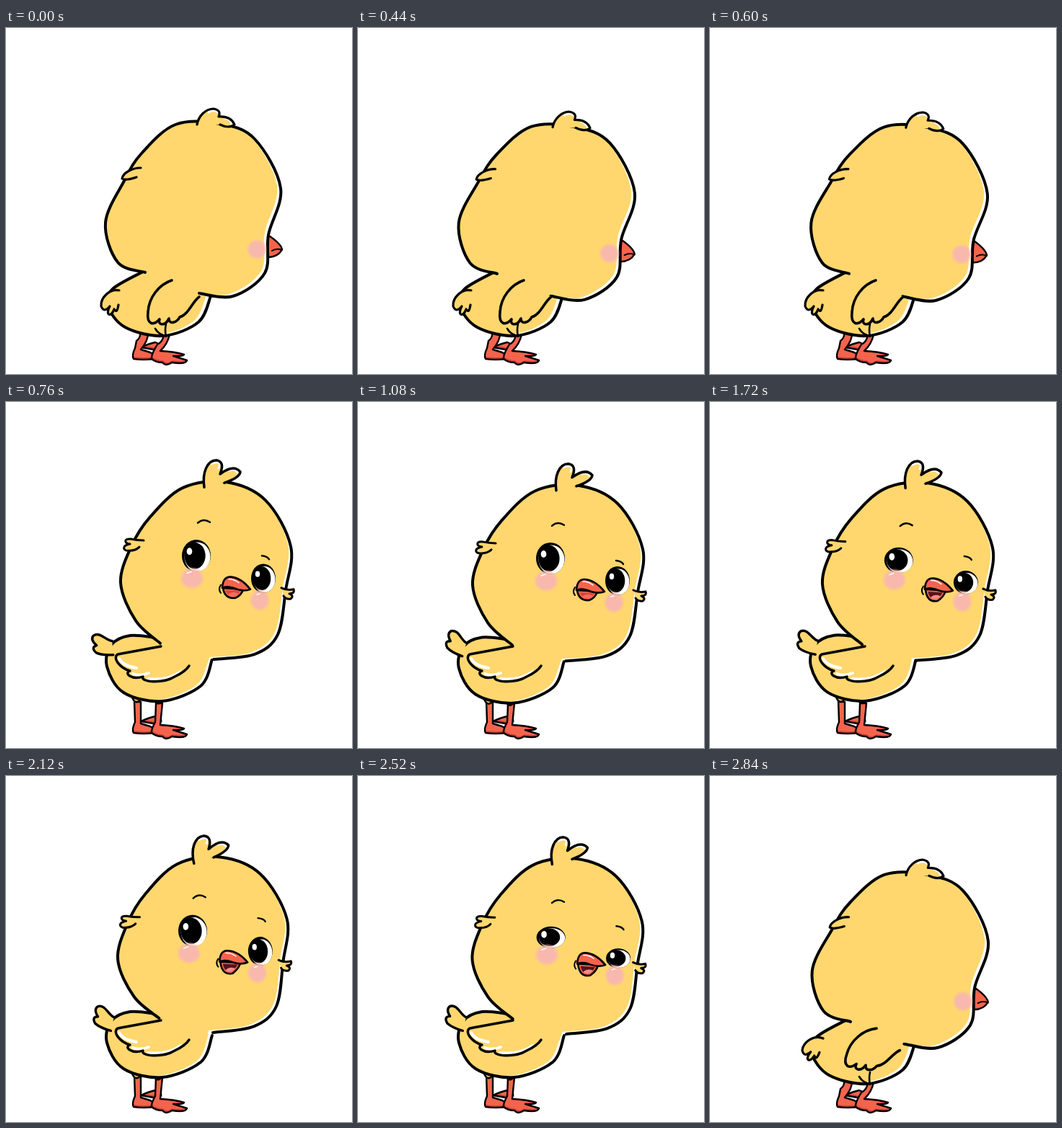
These frames come from a looping animation (480 px wide and 480 px high, 2.88 s). An HTML page with a canvas:

```html
<!DOCTYPE html>
<html>
<head>
<meta charset="utf-8">
<title>Chick</title>
<style>
html, body { margin: 0; width: 100%; height: 100%; overflow: hidden; background: #fff; }
canvas { display: block; }
</style>
</head>
<body>
<canvas id="stage" width="480" height="480"></canvas>
<script>
const ctx = document.getElementById('stage').getContext('2d');
const LOOP = 2880, STEP = 80, TURN_FRONT = 680, TURN_BACK = 2600;
const YELLOW = '#ffd76e', RED = '#f4644d', DARK_RED = '#d9443c', PINK = '#f9b8ad';

const svg = d => new Path2D(d);

// Smooth open curve through "x y, x y, ..." points.
function curve(text) {
  const p = text.split(',').map(s => s.trim().split(' ').map(Number));
  const path = new Path2D();
  path.moveTo(...p[0]);
  for (let i = 0; i < p.length - 1; i++) {
    const b = p[i], c = p[i + 1], a = p[i - 1] || b, d = p[i + 2] || c;
    const handle = (at, from, to, sign) => at.map((v, k) => v + sign * (to[k] - from[k]) / 6);
    path.bezierCurveTo(...handle(b, a, c, 1), ...handle(c, b, d, -1), ...c);
  }
  return path;
}

function ink(path, width = 3, color = '#000') {
  ctx.strokeStyle = color;
  ctx.lineWidth = width;
  ctx.stroke(path);
}
function fill(path, color) {
  ctx.fillStyle = color;
  ctx.fill(path);
}
function shape(path, color, width = 3) {
  fill(path, color);
  ink(path, width);
}
function group(draw) {
  ctx.save();
  draw();
  ctx.restore();
}
function turn(degrees, x, y, sy = 1) {
  ctx.translate(x, y);
  ctx.rotate(degrees * Math.PI / 180);
  ctx.scale(1, sy);
  ctx.translate(-x, -y);
}
// Filled shape with a rim of another colour, made by shifting the fill inside itself.
function rimmed(path, rim, color, dx, dy, width, patch) {
  fill(path, rim);
  group(() => {
    ctx.clip(path);
    ctx.translate(dx, dy);
    fill(path, color);
  });
  if (patch) fill(patch, color);
  ink(path, width);
}
function oval(x, y, rx, ry, color) {
  ctx.beginPath();
  ctx.ellipse(x, y, rx, ry, 0, 0, 7);
  ctx.fillStyle = color;
  ctx.fill();
}
function blush(x, y, rx, ry) {
  group(() => {
    ctx.translate(x, y);
    ctx.scale(rx, ry);
    const soft = ctx.createRadialGradient(0, 0, 0.65, 0, 0, 1);
    soft.addColorStop(0, PINK);
    soft.addColorStop(1, 'rgba(249,184,173,0)');
    oval(0, 0, 1, 1, soft);
  });
}

function drawLegs(nearTop, nearEnd, farTop, farEnd) {
  const toe = svg('M187 443Q198 438 207 436Q222 442 210 447Z');
  const far = svg(farTop + 'L179 444Q174 455 177 459Q190 461 206 459Q211 456 200 450L187 446' + farEnd);
  const near = svg(nearTop + 'L207 444Q201 455 202 459Q208 464 217 464Q222 470 230 464Q250 467 251 461L232 455Q245 456 247 453Q235 449 214 448' + nearEnd);
  for (const part of [toe, far, near]) rimmed(part, DARK_RED, RED, 1, -3, 2.4);
}

function eye(x, y, rx, ry, squint) {
  const open = 1 - 0.4 * squint;
  group(() => {
    turn(0, x, y + ry, open);
    oval(x, y, rx + 1, ry + 1, '#000');
    oval(x + 1.5, y + 1.5, rx - 1, ry - 1, '#fff');
    oval(x - 2, y, rx * 0.77, ry * 0.86, '#000');
  });
  oval(x - rx / 2, y + ry - (ry + 6) * open, rx * 0.2, rx * 0.26, '#fff');
}
function drawMouth(open) {
  const drop = 5 * open, wide = open > 0.5;
  const jaw = svg(`M304 262Q306 ${277 + drop} 321 ${276 + drop / 2}Q330 272 332 264Z`);
  fill(jaw, wide ? '#54141c' : DARK_RED);
  group(() => {
    ctx.clip(jaw);
    oval(319, 274 + drop / 2, 9, 6, wide ? '#f78b86' : '#f46d62');
    ink(jaw, 6, RED);
  });
  ink(jaw, 2.6);
  shape(svg('M303 262Q304 246 315 247Q329 248 342 264Q332 268 318 262Q309 259 303 262Z'), RED, 2.6);
  ink(svg('M312 250Q320 250 326 255'), 1.5, '#fff');
  ink(svg('M301 258Q297 264 301 269'), 2);
}
function drawFace(p) {
  ctx.translate(p.faceX, p.squint);
  eye(267, 218, 19, 21, p.squint);
  eye(360, 249, 16, 19, p.squint);
  blush(261, 249, 18, 16);
  blush(355, 279, 15, 16);
  ink(svg('M254 242l6 -2M351 271l4 -1'), 1.5, '#fff');
  const lift = 5 * p.squint;
  ink(svg(`M269 ${173 + lift}q8 -7 17 -1`), 2.4);
  ink(svg(`M358 ${221 - p.brow}q8 1 10 5`), 2.4);
  drawMouth(p.mouth);
}

function drawFrontBody(tail) {
  shape(svg('M174 410Q177 420 182 419Q187 418 188 411M204 414Q207 422 212 421Q217 419 218 413'), YELLOW, 2.6);
  rimmed(curve('208 330, 172 327, 146 340, 140 370, 163 406, 216 418, 270 397, 286 360'), '#fff', YELLOW, -5, -2, 4);
  turn(tail, 148, 343);
  shape(svg('M151 335C143 330 142 316 131 317Q124 320 129 331Q120 330 124 340Q130 347 144 353'), YELLOW, 3.4);
}
function drawFrontHead(p) {
  ctx.translate(p.x, p.y);
  turn(p.rot, 250, 360, p.stretch);
  const head = curve('214 338, 180 307, 159 255, 174 205, 199 166, 245 125, 305 117, 360 142, 395 205, 388 265, 377 326, 345 353, 288 360');
  rimmed(head, '#fff', YELLOW, -4, -3, 4, svg('M220 330L211 344 278 370 285 350Z'));
  group(() => {
    ctx.translate(p.tuftX, 0);
    turn(p.tuftX / 2, 287, 119);
    const tuft = svg('M275 124C272 104 279 87 292 87Q304 89 297 106Q316 92 325 103Q324 111 303 118');
    fill(tuft, YELLOW);
    ink(svg('M285 92Q292 88 297 92L295 98M310 101Q317 98 321 104'), 3, '#fff');
    ink(tuft, 3.5);
  });
  shape(svg('M191 197Q182 197 173 195C163 194 164 201 172 202C160 204 162 212 171 211Q180 211 185 206'), YELLOW);
  shape(svg('M382 262Q390 266 399 264Q401 270 393 270Q400 273 395 277Q388 278 385 273'), YELLOW);
  drawFace(p);
}
function drawFrontWing() {
  const wing = svg('M215 339Q183 345 155 350C147 355 158 369 172 373C163 376 174 386 190 381C186 389 218 391 234 381Q249 374 254 366');
  fill(wing, YELLOW);
  ink(svg('M157 356Q162 366 181 369M176 377Q185 381 198 376M197 384Q224 387 242 374'), 4, '#fff');
  ink(wing, 3.4);
}
function drawFront(p) {
  drawLegs('M208 418', 'L217 418Z', 'M178 416', 'L187 416Z');
  group(() => {
    ctx.translate(0, -250 * (p.stretch - 1));
    drawFrontBody(p.tail);
  });
  group(() => drawFrontHead(p));
  drawFrontWing();
}

function drawBackHead(p) {
  ctx.translate(p.x, p.y);
  turn(p.rot, 200, 340);
  shape(svg('M360 285Q381 298 383 307Q377 319 360 318Z'), RED, 2.4);
  ink(svg('M369 309Q376 305 383 308'), 2);
  const head = curve('193 339, 155 325, 138 270, 164 212, 188 174, 235 134, 297 133, 345 154, 381 222, 364 287, 359 340, 315 372, 268 368');
  rimmed(head, '#fff', YELLOW, -5, -3, 4, svg('M196 330L188 345 262 380 272 355Z'));
  const tuft = svg('M265 134C267 122 277 112 288 112Q299 114 295 123Q312 122 317 134Q309 140 297 134');
  fill(tuft, YELLOW);
  ink(svg('M281 117Q288 112 294 117M304 125Q311 127 313 133'), 3, '#fff');
  ink(tuft, 3.2);
  shape(svg('M187 194C175 194 162 201 161 209Q166 212 181 207'), YELLOW, 3.2);
  ctx.clip(head);
  blush(348, 307, 15, 15);
}
function drawBack(p) {
  drawLegs('M219 426Q217 436 210 439', 'Q224 439 227 425Z', 'M186 422Q187 430 181 434', 'Q197 434 197 424Z');
  rimmed(curve('190 338, 148 362, 141 385, 165 415, 218 427, 267 408, 284 372'), '#fff', YELLOW, -6, -2, 4);
  ink(svg('M207 417Q211 424 218 426M222 411Q220 419 222 428'), 2.6);
  group(() => {
    turn(p.swing, 157, 364);
    shape(svg('M157 364C143 361 131 375 132 386Q136 396 144 386C137 399 146 402 150 390Q154 397 156 384'), YELLOW, 3.2);
  });
  group(() => drawBackHead(p));
  turn(p.swing, 230, 355);
  shape(svg('M230 350C212 356 198 374 197 394C195 411 204 414 213 404C210 413 221 414 226 403C226 412 237 409 241 401C253 398 259 379 268 373'), YELLOW, 3.6);
}

function ramp(t, from, to) {
  const u = Math.min(1, Math.max(0, (t - from) / (to - from)));
  return u * u * (3 - 2 * u);
}
function bump(t, peak, reach) {
  return 1 - ramp(Math.abs(t - peak), 0, reach);
}

function frontPose(t) {
  const laugh = ramp(t, 1080, 1480), exit = ramp(t, 2440, 2520);
  const late = ramp(t, 1640, 2120) * (1 - exit / 2);
  const land = bump(t, 760, 320), hop = bump(t, 1240, 240), jump = bump(t, 1800, 240);
  return {
    x: 6 * (1 - ramp(t, 680, 760)) - 3 * laugh + 2 * late + 3 * exit,
    y: -3 * (land + hop + jump * 0.5 + late),
    rot: -1.6 * late,
    stretch: 1 + 0.012 * land + 0.008 * hop + 0.018 * jump,
    squint: ramp(t, 1240, 1480) - ramp(t, 1640, 1800) + 0.8 * exit,
    faceX: -3 * land - 2 * laugh - late + 4 * exit,
    tail: -26 * land - 14 * hop - 8 * jump - 6 * laugh - 2 * late,
    mouth: 0.8 * laugh + 0.2 * late,
    tuftX: -7 * late,
    brow: 3 * land + 3 * laugh + 15 * late
  };
}
function backPose(t) {
  if (t < TURN_FRONT) {
    return { x: 0, y: 2 * ramp(t, 120, 440), rot: 1.9 * ramp(t, 120, 600), swing: 0 };
  }
  const settle = ramp(t, TURN_BACK, 2840);
  return { x: 4 - 2 * settle, y: 2, rot: 2 - 0.6 * settle, swing: 12 };
}

function render(now) {
  const t = now % LOOP;
  const time = t < 40 ? 0 : 40 + STEP * Math.floor((t - 40) / STEP);
  ctx.fillStyle = '#fff';
  ctx.fillRect(0, 0, 480, 480);
  ctx.lineCap = ctx.lineJoin = 'round';
  group(() => {
    if (time >= TURN_FRONT && time < TURN_BACK) drawFront(frontPose(time));
    else drawBack(backPose(time));
  });
}

const start = performance.now();
function tick() {
  render(performance.now() - start);
  requestAnimationFrame(tick);
}
tick();
</script>
</body>
</html>
```
